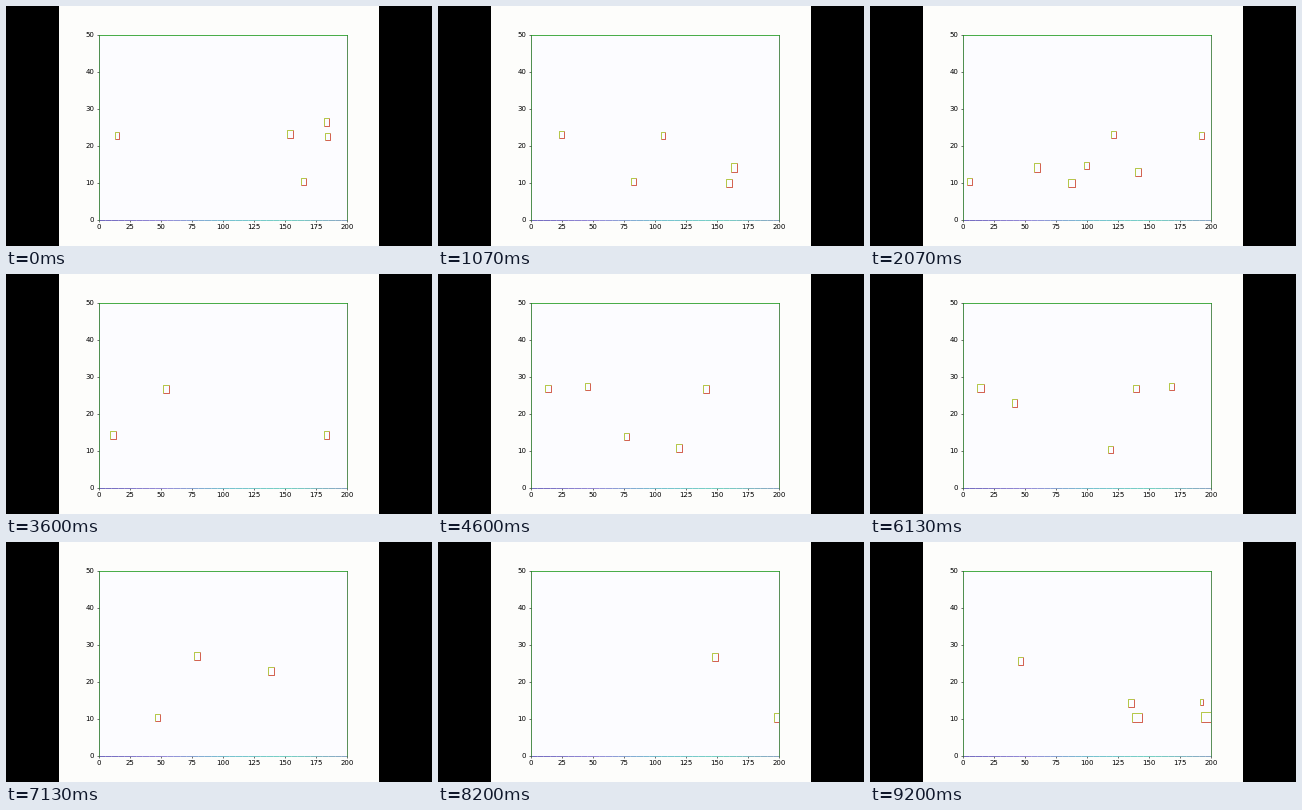
A matplotlib script that plays this animation: 426 by 240 pixels, repeating every 9270 ms.

```python
import numpy as np
import matplotlib.pyplot as plt
from matplotlib.animation import FuncAnimation
from matplotlib.collections import LineCollection
from matplotlib.colors import LinearSegmentedColormap
from matplotlib.patches import Rectangle

W, H, DPI = 426, 240, 50
FRAMES, LOOP = 139, 9270
STEP = LOOP / FRAMES


def lane_speed(y, length):
    if length > 7:
        return -59.5
    if y < 12:
        return -72
    if y < 18:
        return -104
    return 97 if y < 25 else 82


class Car:
    """Box with steady speed, placed by its centre at time t."""

    def __init__(self, t, x, y, length, vx=None, vy=0):
        self.t, self.x, self.y, self.vy = t, x, y, vy
        self.vx = lane_speed(y, length) if vx is None else vx
        self.w, self.h = length, min(2.6, 0.9 + 0.26 * length)

    def corners(self, t):
        x = self.x + self.vx * (t - self.t)
        y = self.y + self.vy * (t - self.t)
        return x - self.w / 2, x + self.w / 2, y - self.h / 2, y + self.h / 2


cars = []


def traffic(t, *group):
    cars.extend(Car(t, *c) for c in group)


traffic(0, (14.5, 22.8, 3.8, 86.1), (154, 23.2, 4.8), (183.7, 26.4, 4),
        (184.3, 22.6, 3.8), (165, 10.3, 4.2, -77.2))
traffic(2.07, (59.5, 14.1, 5), (87.5, 9.9, 5.5), (99.2, 14.6, 4),
        (121.6, 22.9, 3.8), (141, 13, 4.9, -88.6, 0.92))
traffic(3.6, (59.5, 26.7, 5, 87.5), (176.2, 14.2, 4, -106, -0.4))
traffic(4.6, (19.2, 26.8, 4.4), (50.6, 27.3, 4.4, 80),
        (113.5, 10.7, 4.4, -91))
traffic(6.13, (18.1, 27, 5.3, 65, -0.13), (47.4, 22.9, 4.5),
        (114.7, 10.3, 3.7))
traffic(9.2, (136.7, 10.3, 8), (195.5, 10.5, 15), (51.4, 25.6, 4.4, 82, 0.5),
        (128.8, 14.3, 5.2), (185.8, 14.4, 3))

fig = plt.figure(figsize=(W / DPI, H / DPI), dpi=DPI, facecolor="black")
fig.add_artist(Rectangle((53 / W, 0), 320 / W, 1, color="#fdfdfb", lw=0,
                         transform=fig.transFigure, zorder=-1))

ax = fig.add_axes([93 / W, 0.11, 248 / W, 0.77], facecolor="#fcfcff")
ax.set_xlim(0, 200)
ax.set_ylim(0, 50)
ax.set_xticks(range(0, 201, 25))
ax.set_yticks(range(0, 51, 10))
for side, color in (("top", "#149614"), ("left", "#1c6e1c"),
                    ("right", "#2a702a")):
    ax.spines[side].set(color=color, linewidth=1.1)
ax.spines["bottom"].set_visible(False)

# The lower edge shades from violet to cyan
shade = LinearSegmentedColormap.from_list(
    "edge", ["#4a3fae", "#7a6cd0", "#4fb0c4", "#4fc4b4", "#6a86b4"])
xs = np.linspace(0, 200, 41)
edge = [[(a, 0), (b, 0)] for a, b in zip(xs[:-1], xs[1:])]
ax.add_collection(LineCollection(edge, colors=shade(xs[:-1] / 200),
                                 linewidths=1.1, clip_on=False, zorder=2.5),
                  autolim=False)


def outline(color):
    return ax.plot([], [], color=color, lw=1.2, solid_capstyle="butt")[0]


boxes = [(outline("#a8be28"), outline("#cc4632")) for _ in cars]


def draw(i):
    for car, (upper, lower) in zip(cars, boxes):
        l, r, b, u = car.corners(i * STEP / 1000)
        upper.set_data([l, l, r], [b, u, u])
        lower.set_data([l, r, r], [b, b, u])
    return [line for pair in boxes for line in pair]


anim = FuncAnimation(fig, draw, frames=FRAMES, interval=STEP,
                     init_func=lambda: draw(0), repeat=True, repeat_delay=0)
plt.show()
```
